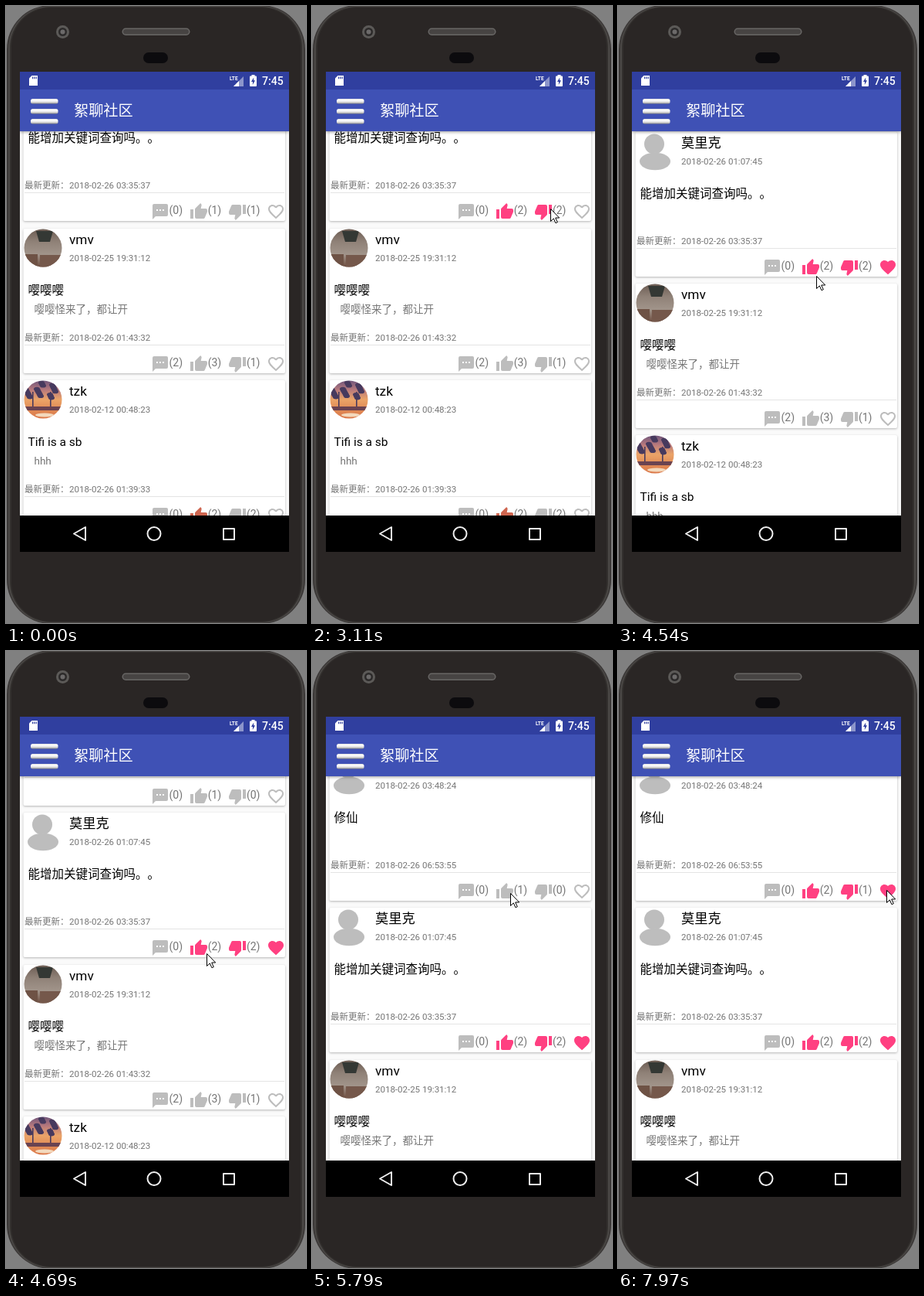
These frames come from a looping animation (389 by 798 pixels, 8 s). An HTML page with a canvas:

```html
<!DOCTYPE html>
<html lang="zh-CN">
<head>
<meta charset="utf-8">
<style>
html, body { margin: 0; height: 100%; overflow: hidden; background: #808080; }
canvas { display: block; }
</style>
</head>
<body>
<canvas id="stage" width="389" height="798"></canvas>
<script>
const ctx = document.getElementById('stage').getContext('2d');
const PINK = '#ff4081', GREY = '#bdbdbd', LOOP = 8000;

const bubble = new Path2D('M20 2H4a2 2 0 0 0-2 2v18l4-4h14a2 2 0 0 0 2-2V4a2 2 0 0 0-2-2zM9 11H7V9h2zM13 11h-2V9h2zM17 11h-2V9h2z');
const thumb = new Path2D('M1 21h4V9H1zM23 10a2 2 0 0 0-2-2h-6.3l1-4.9L14.2 1 7.6 7.6A2 2 0 0 0 7 9v10a2 2 0 0 0 2 2h9a2 2 0 0 0 1.8-1.2l3-7A2 2 0 0 0 23 12z');
const heart = new Path2D('M12 21.3l-1.4-1.3C5.4 15.4 2 12.3 2 8.5 2 5.4 4.4 3 7.5 3c1.7 0 3.4.8 4.5 2.1C13.1 3.8 14.8 3 16.5 3 19.6 3 22 5.4 22 8.5c0 3.8-3.4 6.9-8.5 11.5z');
const arrow = new Path2D('M.5.5v16l3.8-3.6 2.6 5.8 2.4-1-2.6-5.7h5z');

// Where the pointer is at a tick; it eases into each point
const pointer = [[0, 313, 753], [6, 254, 269], [11, 254, 269], [14, 317, 259], [15, 309, 262],
  [18, 309, 262], [21, 347, 260], [24, 330, 247], [25, 262, 277], [27, 257, 349], [30, 263, 425],
  [35, 257, 313], [36, 257, 313], [40, 301, 308], [42, 301, 308], [45, 345, 309], [47, 348, 309]];

// up, down and fav hold the tick at which each button is pressed
const posts = [
  { name: '', date: '2018-02-26 03:48:24', title: '修仙', body: '', updated: '2018-02-26 06:53:55',
    counts: [0, 1, 0], up: 36, down: 41, fav: 49, avatar: blankAvatar },
  { name: '莫里克', date: '2018-02-26 01:07:45', title: '能增加关键词查询吗。\u200b。', body: '', updated: '2018-02-26 03:35:37',
    counts: [0, 1, 1], up: 10, down: 18, fav: 22, avatar: blankAvatar },
  { name: 'vmv', date: '2018-02-25 19:31:12', title: '嘤嘤嘤', body: '嘤嘤怪来了，都让开', updated: '2018-02-26 01:43:32',
    counts: [2, 3, 1], avatar: roomAvatar },
  { name: 'tzk', date: '2018-02-12 00:48:23', title: 'Tifi is a sb', body: 'hhh', updated: '2018-02-26 01:39:33',
    counts: [0, 2, 2], upColor: '#cf6650', avatar: duskAvatar }
];

// Progress from 0 to 1 between two ticks
const span = (k, a, b) => Math.min(1, Math.max(0, (k - a) / (b - a)));
const scrollAt = k => 241 * span(k, 24, 30) ** 1.76;
const barShiftAt = k => -7 * Math.sin(Math.PI * span(k, 29, 33));

function pointerAt(k) {
  const i = pointer.findIndex(p => p[0] > k);
  if (i < 0) return pointer[pointer.length - 1].slice(1);
  const [a, ax, ay] = pointer[i - 1], [b, bx, by] = pointer[i];
  const f = span(k, a, b), e = f * (2 - f);
  return [Math.round(ax + (bx - ax) * e), Math.round(ay + (by - ay) * e)];
}

function box(x, y, w, h, color, r = 0) {
  ctx.fillStyle = color;
  ctx.beginPath();
  ctx.roundRect(x, y, w, h, r);
  ctx.fill();
}

function oval(x, y, rx, ry, color) {
  ctx.fillStyle = color;
  ctx.beginPath();
  ctx.ellipse(x, y, rx, ry, 0, 0, 7);
  ctx.fill();
}

function poly(color, ...pts) {
  ctx.fillStyle = color;
  ctx.beginPath();
  pts.forEach(p => ctx.lineTo(...p));
  ctx.closePath();
  ctx.fill();
}

function text(s, x, y, size, color, weight = 400) {
  ctx.font = `${weight} ${size}px Roboto, "Noto Sans CJK SC", "Noto Sans CJK", sans-serif`;
  ctx.fillStyle = color;
  ctx.fillText(s, x, y);
}

function fade(y0, y1, ...colors) {
  const g = ctx.createLinearGradient(0, y0, 0, y1);
  colors.forEach((c, i) => g.addColorStop(i / (colors.length - 1), c));
  return g;
}

function local(x, y, draw) {
  ctx.save();
  ctx.translate(x, y);
  draw();
  ctx.restore();
}

function shadowed(alpha, blur, draw) {
  ctx.save();
  ctx.shadowColor = `rgba(0,0,0,${alpha})`;
  ctx.shadowBlur = blur;
  ctx.shadowOffsetY = 1;
  draw();
  ctx.restore();
}

function clipRound() {
  ctx.beginPath();
  ctx.arc(0, 0, 24.5, 0, 7);
  ctx.clip();
}

// Avatars are drawn around their centre
function blankAvatar() {
  oval(-1, -9.5, 13, 13, GREY);
  oval(0, 13, 20, 11.3, GREY);
}

function roomAvatar() {
  clipRound();
  box(-25, -25, 50, 50, fade(-25, 25, '#6b5b52', '#8f8177', '#a1948a', '#6b4a3c'));
  poly('#343834', [-9, -22], [13, -22], [9, -8], [-5, -8]);
  box(-25, 8, 18, 17, '#6e5245');
  box(-4, 9, 29, 16, '#75584b');
}

function duskAvatar() {
  clipRound();
  box(-25, -25, 50, 50, fade(-25, 25, '#6d557c', '#b8797c', '#eba468', '#e08a55', '#dc7a4c'));
  for (let i = 0; i < 26; i++) {
    const x = i * 17 % 50 - 25;
    oval(x, -22 + i * 7 % 19 + Math.abs(x) / 6, 4, 2.6, '#473a5e');
  }
  [-14, 9].forEach(x => box(x, -10, 1.6, 24, '#473a5e'));
  box(-25, 9, 50, 5, '#6a4351');
  oval(2, 20, 12, 2.5, '#f3d9bd');
}

function icon(path, x, y, color, flip) {
  local(x + 12, y + 12, () => {
    if (flip) ctx.rotate(Math.PI);
    ctx.translate(-12, -12);
    ctx.fillStyle = color;
    ctx.fill(path, 'evenodd');
  });
}

function heartIcon(x, y, on) {
  if (on) return icon(heart, x, y, PINK);
  local(x, y, () => {
    ctx.clip(heart);
    ctx.strokeStyle = GREY;
    ctx.lineWidth = 4;
    ctx.stroke(heart);
  });
}

function card(p, top, k) {
  const up = k >= p.up, down = k >= p.down, [talk, likes, dislikes] = p.counts;
  const grey = '#757575', row = 163;
  local(0, top, () => {
    shadowed(.28, 3, () => box(22.5, 0, 339.5, 187, '#fff', 2));
    local(48, 25, p.avatar);
    text(p.name, 82, 20, 17.2, '#000');
    text(p.date, 82, 42, 11.5, grey);
    text(p.title, 28.5, 85, 15.5, '#000');
    text(p.body, 36.5, 109, 13.5, grey);
    text('最新更新：', 24, 145, 11.5, grey);
    text(p.updated, 82, 145, 11.5, grey);
    box(24, 150, 337, 1, '#e4e4e4');
    icon(bubble, 188, row, GREY);
    icon(thumb, 238, row, up ? PINK : p.upColor || GREY);
    icon(thumb, 288, row, down ? PINK : GREY, true);
    heartIcon(338, row, k >= p.fav);
    [talk, likes + up, dislikes + down].forEach((n, i) => text(`(${n})`, 211.5 + i * 50.2, 178, 14, grey));
  });
}

function phone() {
  box(0, 0, 389, 798, '#808080');
  ['#3a3736', '#4b4846', '#33302e', '#2a2625'].forEach((color, i) =>
    box(1 + i * 2, i - 1, 387 - i * 4, 800 - i * 2, color, 57 - i * 2));
  oval(73.5, 33.5, 8.5, 8.5, '#5c5a58');
  oval(73.5, 33.5, 5.5, 5.5, '#2c2a2a');
  oval(73.5, 33.5, 3, 3, '#6c6a6a');
  box(150.5, 28.5, 88, 9.5, '#686665', 4.7);
  box(152, 30, 85, 6.5, '#474443', 3.2);
  box(178, 60, 32, 14, '#0c0b0e', 7);
}

function statusBar() {
  box(18, 85, 349, 23, '#303f9f');
  poly('#fff', [33.5, 90], [41, 90], [41, 103], [30, 103], [30, 93.5]);
  [34, 36.3, 38.6].forEach(x => box(x, 91.5, 1.2, 2.8, '#303f9f'));
  text('LTE', 290, 96, 6.5, '#fff', 700);
  poly('#8c95cb', [308, 91], [308, 104], [295, 104]);
  poly('#fff', [302, 97], [302, 104], [295, 104]);
  box(316, 90.5, 9, 13.5, '#fff', 1);
  box(318.5, 89, 4, 2, '#fff');
  poly('#303f9f', [321.2, 92.5], [318, 98], [320, 98], [319.8, 102], [323, 96.3], [321.1, 96.3]);
  text('7:45', 332, 102, 14, '#fff', 500);
}

function toolbar(shift) {
  local(0, shift, () => {
    shadowed(.4, 4, () => box(18, 100, 349, 62, '#3f51b5'));
    [120, 133, 146].forEach(y => box(32, y, 35.5, 6.5, fade(y, y + 6.5, '#e4e4e4', '#fff', '#dcdcdc', '#8a8a8a'), 2.5));
    text('絮聊社区', 88, 142.3, 19.2, '#fff');
  });
}

function navBar() {
  box(18, 659, 349, 47, '#000');
  ctx.strokeStyle = '#eee';
  ctx.lineWidth = 2;
  ctx.lineJoin = 'round';
  ctx.stroke(new Path2D('M88 682.5L103 674v17z'));
  ctx.beginPath();
  ctx.arc(192, 682.5, 8.5, 0, 7);
  ctx.stroke();
  ctx.strokeRect(282, 676, 14, 14);
}

function draw(t) {
  const k = Math.floor((t - 295) / 156.2);
  const shift = Math.round(barShiftAt(k));
  phone();
  ctx.save();
  ctx.beginPath();
  ctx.rect(18, 85, 349, 574);
  ctx.clip();
  box(18, 85, 349, 574, '#fafafa');
  posts.forEach((p, i) => card(p, Math.round(i * 196.4 - 105 + scrollAt(k)) + shift, k));
  toolbar(shift);
  statusBar();
  ctx.restore();
  navBar();
  if (k < 0) return;
  local(...pointerAt(k), () => {
    ctx.fillStyle = '#fff';
    ctx.fill(arrow);
    ctx.strokeStyle = '#000';
    ctx.lineWidth = 1;
    ctx.lineJoin = 'miter';
    ctx.stroke(arrow);
  });
}

const start = performance.now();
function tick() {
  draw((performance.now() - start) % LOOP);
  requestAnimationFrame(tick);
}
tick();
</script>
</body>
</html>
```
